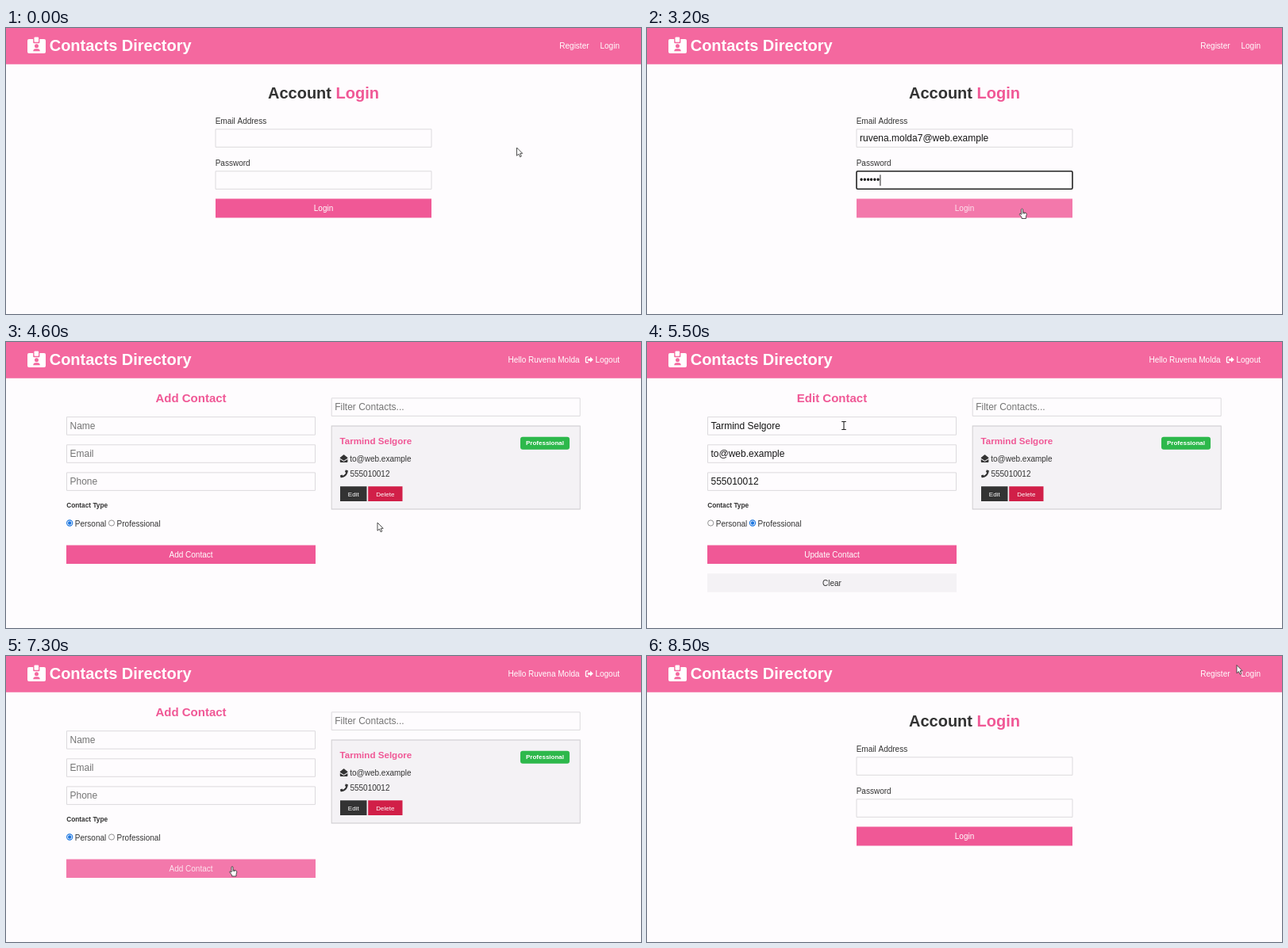
Write an HTML page with a canvas that moves like this. It is 800 px wide and 361 px high and loops after 8.6 s.

```html
<!DOCTYPE html>
<html lang="en">
<head>
<meta charset="utf-8">
<title>Contacts Directory</title>
<style>
html, body { margin: 0; width: 100%; height: 100%; overflow: hidden; background: #fefcfe; }
canvas { display: block; width: 800px; height: 361px; }
</style>
</head>
<body>
<canvas id="stage" width="800" height="361"></canvas>
<script>
const ctx = document.getElementById('stage').getContext('2d');
const LOOP = 8600, STEP = 100;
const PAGE = '#fefcfe', BAR = '#f4689f', PINK = '#f05896', DARK = '#333', INK = '#161616';

const USER = 'Ruvena Molda';
const LOGIN_EMAIL = 'ruvena.molda7@web.example';
const CONTACT = ['Tarmind Selgore', 'to@web.example', '555010012'];

// Moments at which the interface changes, in ms
const AT = { email: 1300, fill: 1500, password: 2000, typing: 2300, home: 3500,
             edit: 5300, update: 7100, logout: 8300 };

// Pointer stops: time, x, y
const STOPS = [
  [0, 643.5, 151], [900, 643.5, 151], [1300, 532, 144], [1600, 532, 144],
  [1900, 500, 192], [2800, 500, 192], [3200, 472.5, 228], [4100, 472.5, 228],
  [4500, 468, 228], [4900, 468, 228], [5200, 438, 190], [5300, 438, 190],
  [5500, 248, 105.5], [5900, 248, 105.5], [6700, 270, 222], [6900, 285, 265.5],
  [7600, 285, 265.5], [8100, 752, 20], [8300, 752, 20], [8500, 743, 11.5]
];

function pointerAt(t) {
  const i = STOPS.findIndex(s => s[0] > t);
  if (i < 0) return STOPS[STOPS.length - 1].slice(1);
  const [t0, x0, y0] = STOPS[i - 1], [t1, x1, y1] = STOPS[i];
  const k = (t - t0) / (t1 - t0), e = k * k * (3 - 2 * k);
  return [x0 + (x1 - x0) * e, y0 + (y1 - y0) * e];
}

let pointer = [0, 0], shape = 'arrow';

function over(x, y, w, h, kind) {
  const [px, py] = pointer;
  const hit = px >= x && px <= x + w && py >= y && py <= y + h;
  if (hit) shape = kind;
  return hit;
}

function box(x, y, w, h, color, radius = 0) {
  ctx.fillStyle = color;
  ctx.beginPath();
  ctx.roundRect(x, y, w, h, radius);
  ctx.fill();
}

function text(str, x, y, size = 10, color = DARK, { bold = false, align = 'left' } = {}) {
  ctx.font = `${bold ? 'bold ' : ''}${size}px "Liberation Sans", Arial, sans-serif`;
  ctx.textAlign = align;
  ctx.fillStyle = color;
  ctx.fillText(str, x, y);
  return ctx.measureText(str).width;
}

function button(label, x, y, w, h, color, ink = '#fff', size = 10) {
  ctx.globalAlpha = over(x, y, w, h, 'hand') ? 0.8 : 1;
  box(x, y, w, h, color);
  text(label, x + w / 2, y + h / 2 + size * 0.37, size, ink, { align: 'center' });
  ctx.globalAlpha = 1;
}

function field(x, y, w, value, { hint = '', focus = false } = {}) {
  over(x, y, w, 23.5, 'beam');
  ctx.beginPath();
  ctx.roundRect(x + 0.5, y + 0.5, w - 1, 22.5, focus ? 1.5 : 0);
  ctx.lineWidth = focus ? 1.6 : 1;
  ctx.strokeStyle = focus ? '#222' : '#dcdadd';
  ctx.stroke();
  const width = text(value || hint, x + 4.5, y + 16, 12, value ? INK : '#757575');
  if (focus) box(x + 4.7 + (value ? width : 0), y + 5, 1, 14, '#222');
}

function radio(x, y, on) {
  ctx.beginPath();
  ctx.arc(x, y, 3.6, 0, Math.PI * 2);
  ctx.lineWidth = on ? 1.1 : 0.8;
  ctx.strokeStyle = on ? '#1a75e0' : '#777';
  ctx.stroke();
  if (!on) return;
  ctx.beginPath();
  ctx.arc(x, y, 2.2, 0, Math.PI * 2);
  ctx.fillStyle = '#1a75e0';
  ctx.fill();
}

function icon(path, x, y, color) {
  ctx.save();
  ctx.translate(x, y);
  ctx.fillStyle = color;
  ctx.fill(new Path2D(path));
  ctx.restore();
}

function badgeIcon() {
  box(27, 14, 23, 18, '#fff', 2);
  box(34.2, 13, 8.2, 6.2, BAR, 1);
  box(35.5, 11.5, 5.6, 6.3, '#fff', 1);
  icon('M11.5 9a2.5 2.5 0 1 1 0 5a2.5 2.5 0 1 1 0-5zM7.2 18q.2-3 3-3h2.6q2.8 0 3 3z', 27, 11.3, BAR);
}

const ICONS = {
  phone: 'M7 .2L9.6.7Q10 .9 10 1.4C9.6 6.3 6.3 9.6 1.4 10Q.9 10 .7 9.5L.1 7.2L2.6 6.2L3.8 7.5Q6.3 6.3 7.5 3.8L6.2 2.6z',
  mailTop: 'M0 4L4.2.5Q4.8 0 5.4.5L9.6 4V4.7L5.4 7.6Q4.8 8 4.2 7.6L0 4.7z',
  mailBase: 'M0 5.9L4 8.6Q4.8 9.1 5.6 8.6L9.6 5.9V9Q9.6 10 8.7 10H.9Q0 10 0 9z',
  exit: 'M3.8 0H1.5Q0 0 0 1.5V6.7Q0 8.2 1.5 8.2H3.8V6.9H1.9Q1.3 6.9 1.3 6.3V1.9Q1.3 1.3 1.9 1.3H3.8zM6.2.6L10 4.1L6.2 7.6V5.5H3V2.7H6.2z'
};

function header(signedIn) {
  box(0, 0, 800, 45.7, BAR);
  badgeIcon();
  text('Contacts Directory', 54.7, 29.2, 20, '#fff', { bold: true });
  if (signedIn) {
    text('Hello ' + USER, 722.5, 26, 10, '#fff', { align: 'right' });
    over(730, 16, 43, 13, 'hand');
    icon(ICONS.exit, 729.8, 18.2, '#fff');
    text('Logout', 742.4, 26, 10, '#fff');
  } else {
    over(748, 16, 25, 13, 'hand');
    text('Register', 697.3, 26, 10, '#fff');
    text('Login', 748.5, 26, 10, '#fff');
  }
}

function loginPage(t) {
  const active = t < AT.logout;
  const email = active && t >= AT.fill ? LOGIN_EMAIL : '';
  const dots = active ? Math.max(0, Math.min(6, Math.floor((t - AT.typing) / STEP) + 1)) : 0;
  const w = text('Account ', 330, 89, 20, DARK, { bold: true });
  text('Login', 330 + w, 89, 20, PINK, { bold: true });
  text('Email Address', 263.7, 121.3);
  field(263.5, 127.3, 273, email, { focus: t >= AT.email && t < AT.password });
  text('Password', 263.7, 174.3);
  field(263.5, 180.3, 273, '•'.repeat(dots), { focus: active && t >= AT.password });
  button('Login', 264, 215.5, 272, 24, PINK);
}

function contactForm(editing) {
  const values = editing ? CONTACT : ['', '', ''];
  text(editing ? 'Edit Contact' : 'Add Contact', 233, 75.7, 15, PINK, { bold: true, align: 'center' });
  ['Name', 'Email', 'Phone'].forEach((hint, i) => field(76, 94.2 + i * 35.1, 314, values[i], { hint }));
  text('Contact Type', 76.2, 208.6, 8.3, DARK, { bold: true });
  radio(80.2, 228.5, !editing);
  text('Personal', 86.8, 232.6);
  radio(133, 228.5, editing);
  text('Professional', 139.6, 232.6);
  button(editing ? 'Update Contact' : 'Add Contact', 76, 256.4, 314, 23.6, PINK);
  if (editing) button('Clear', 76, 292.2, 314, 23.6, '#f4f2f5', DARK);
}

function contactCard() {
  field(409.7, 70.4, 314, '', { hint: 'Filter Contacts...' });
  box(409.7, 105.5, 314, 106, '#cccacd');
  box(410.6, 106.4, 312.2, 104.2, '#f4f2f5');
  text(CONTACT[0], 420.6, 129, 11.6, PINK, { bold: true });
  box(648, 119.7, 62, 16, '#2db84b', 3);
  text('Professional', 679, 130.3, 8, '#fff', { bold: true, align: 'center' });
  icon(ICONS.mailTop, 420.8, 142, DARK);
  icon(ICONS.mailBase, 420.8, 142, DARK);
  text(CONTACT[1], 433.2, 151);
  icon(ICONS.phone, 420.8, 161.3, DARK);
  text(CONTACT[2], 433.4, 170.2);
  button('Edit', 421, 182.2, 33.5, 18.8, DARK, '#fff', 8);
  button('Delete', 456.2, 182.2, 43.3, 18.8, '#d11f48', '#fff', 8);
}

const ARROW = 'M0 0V10.2L2.4 8L4.1 11.7L5.8 11L4.2 7.3H7.2z';
const HAND = 'M-1 .8Q0-.5 1 .8V4.6L4.6 5.4Q6 5.8 5.8 7.4L5 10.2V12.5H-.4V11L-3.2 7.4Q-3.4 6 -2.2 6.4L-1 7.5z';

function drawPointer([x, y]) {
  ctx.save();
  ctx.translate(x, y);
  ctx.lineJoin = 'round';
  if (shape === 'beam') {
    ctx.strokeStyle = '#222';
    ctx.lineWidth = 1.1;
    ctx.stroke(new Path2D('M-2.8-5H2.8M0-5V5M-2.8 5H2.8'));
  } else {
    const path = new Path2D(shape === 'hand' ? HAND : ARROW);
    ctx.fillStyle = '#fff';
    ctx.fill(path);
    ctx.strokeStyle = '#3c3c3c';
    ctx.lineWidth = 0.9;
    ctx.stroke(path);
    if (shape === 'hand') ctx.stroke(new Path2D('M1 4.6V6.6M2.8 5V6.8'));
  }
  ctx.restore();
}

function draw(t) {
  const signedIn = t >= AT.home && t < AT.logout;
  pointer = pointerAt(t);
  shape = 'arrow';
  box(0, 0, 800, 361, PAGE);
  header(signedIn);
  if (signedIn) {
    contactForm(t >= AT.edit && t < AT.update);
    contactCard();
  } else {
    loginPage(t);
  }
  // The pointer rests as an arrow once the page under it has been replaced
  drawPointer(pointer);
}

const start = performance.now();
function tick() {
  const t = (performance.now() - start) % LOOP;
  draw(Math.floor(t / STEP) * STEP);
  requestAnimationFrame(tick);
}
tick();
</script>
</body>
</html>
```
